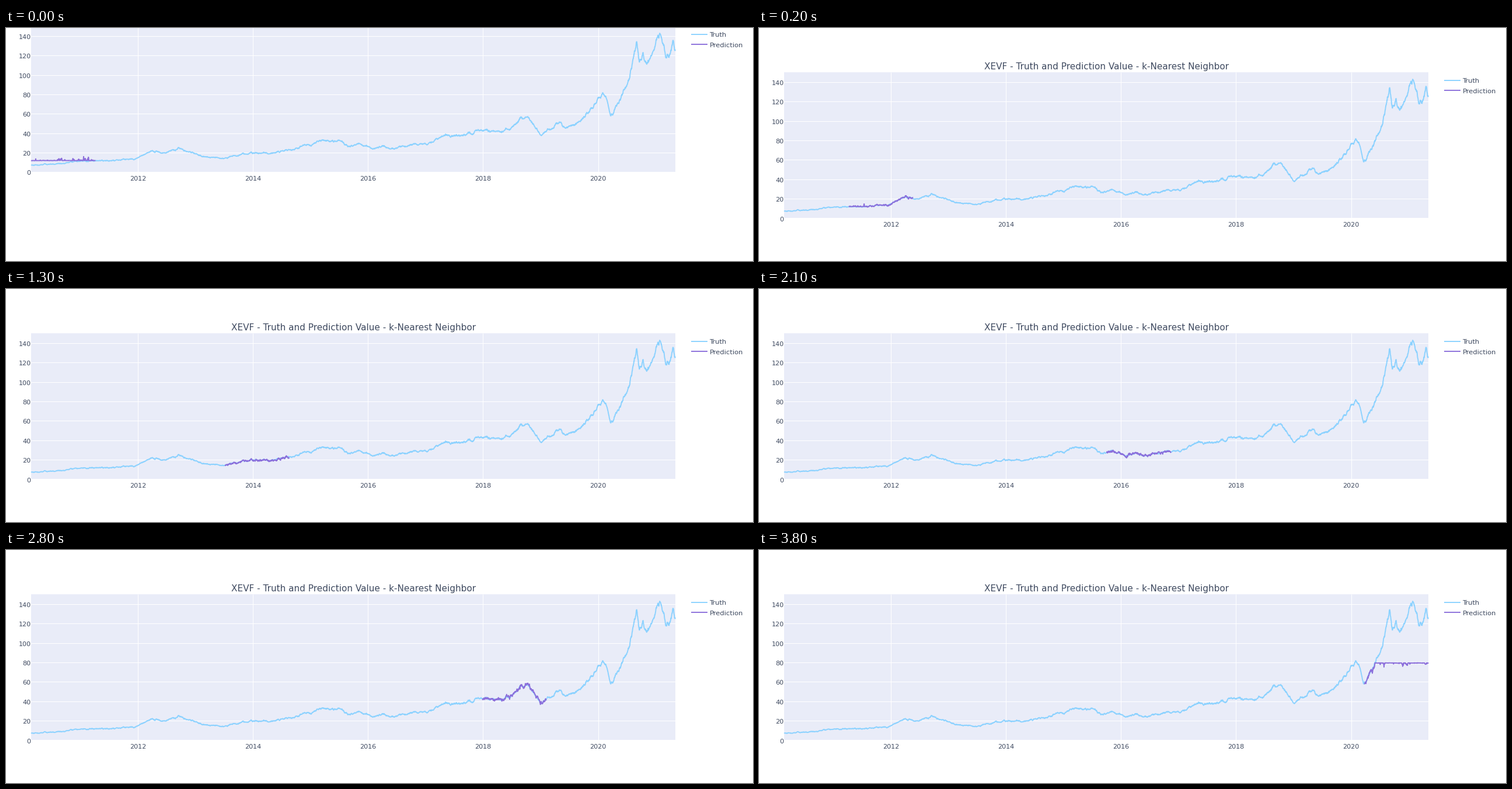
These frames come from a looping animation (1280 px wide and 400 px high, 4300 ms). A matplotlib script:

```python
import numpy as np
import matplotlib
import matplotlib.pyplot as plt
from matplotlib.animation import FuncAnimation
from matplotlib.patches import Rectangle

W, H, DPI = 1280, 400, 100
PT = 72 / DPI                      # points per pixel
LEFT, RIGHT, TOP, BASE = 43, 1147, 76, 326.5
TRUTH, PRED = "#8CD2FF", "#8C6FDB"
PANEL, INK = "#E9ECF8", "#3F4A60"
SCROLL = 79                        # page offset before the view settles
STARTS = [0, 2, 8, 11, 15, 21, 24, 26, 30, 36]   # first tick of each fold
KNOWN = 12, 79.5                   # range the predictor can reach

matplotlib.rcParams["font.family"] = "DejaVu Sans"
matplotlib.rcParams["path.simplify"] = False
rng = np.random.default_rng(12)


def px(year):
    return 226.3 + 98.525 * (year - 2012)


def py(value):
    return BASE - 1.668 * value


def drift(n, keep):
    """Mean-reverting noise with unit spread."""
    out = np.zeros(n)
    kicks = rng.normal(0, np.sqrt(1 - keep ** 2), n)
    for i in range(1, n):
        out[i] = keep * out[i - 1] + kicks[i]
    return out


# Main turning points of the trend: year, value
turns = np.array([
    (2010.14, 7), (2010.7, 9), (2010.85, 11), (2011.5, 11.8), (2011.95, 14),
    (2012.25, 21.5), (2012.4, 19.5), (2012.72, 24.5), (2013.1, 16.5),
    (2013.5, 14.3), (2013.97, 20), (2014.3, 18.8), (2014.78, 25),
    (2014.9, 29), (2015, 27), (2015.15, 32), (2015.55, 32), (2015.65, 26.5),
    (2015.87, 29.5), (2016.08, 24), (2016.28, 27.5), (2016.37, 23.5),
    (2016.8, 28.5), (2017.03, 29.5), (2017.37, 38.5), (2017.5, 36.5),
    (2018.05, 44), (2018.32, 41), (2018.53, 47.5), (2018.67, 56),
    (2018.8, 55), (2019, 37), (2019.34, 52), (2019.42, 44.5), (2019.7, 53),
    (2020.07, 80), (2020.13, 80), (2020.22, 57), (2020.55, 97),
    (2020.67, 132), (2020.72, 110), (2020.78, 121), (2020.84, 111),
    (2021.07, 141), (2021.18, 119), (2021.25, 122), (2021.3, 134),
    (2021.346, 128)])

days = np.arange(2010.14, 2021.346, 1 / 252)
trend = np.interp(days, *turns.T)
truth = trend + drift(len(days), 0.9) * (0.2 + 0.016 * trend)


def prediction(idx):
    """Lagging copy of the truth, held inside the known range."""
    seen = truth[np.maximum(idx - 2, 0)]
    held = np.clip(seen, *KNOWN)
    inward = np.sign(held - seen)
    noise = drift(len(idx), 0.7)
    slip = inward * 1.7 * np.maximum(noise - 0.9, 0) + 0.12 * noise
    wobble = noise * (0.15 + 0.016 * seen)
    return px(days[idx]), py(held + np.where(inward, slip, wobble))


folds = [prediction(idx)
         for idx in np.array_split(np.arange(len(days)), len(STARTS))]

fig = plt.figure(figsize=(W / DPI, H / DPI), dpi=DPI, facecolor="white")
ax = fig.add_axes([0, 0, 1, 1])
ax.set_xlim(0, W)
ax.axis("off")


def label(x, y, text, size=11.1, ha="center"):
    ax.text(x, y, text, fontsize=size * PT, color=INK, ha=ha, va="baseline")


def stroke(x, y, color, width, z=3):
    return ax.plot(x, y, color=color, lw=width * PT, zorder=z,
                   solid_capstyle="butt")[0]


ax.add_patch(Rectangle((LEFT, TOP), RIGHT - LEFT, BASE - TOP,
                       facecolor=PANEL, edgecolor="none", zorder=0))
for value in range(0, 141, 20):
    y = py(value)
    stroke([LEFT, RIGHT], [y, y], "white", 1 if value else 2, 1)
    label(42.5, y + 5, str(value), ha="right")
for year in range(2012, 2021, 2):
    x = px(year)
    stroke([x, x], [TOP, BASE], "white", 1, 1)
    label(x, 341.3, str(year))

label(595.7, 70.7, "XEVF - Truth and Prediction Value - k-Nearest Neighbor", 15.25)
for y, name, color in ((89.5, "Truth", TRUTH), (107.3, "Prediction", PRED)):
    stroke([1174, 1202], [y, y], color, 1.9)
    label(1206, y + 4.3, name, 11.5, "left")

stroke(px(days), py(truth), TRUTH, 1.9)
pred_line = stroke([], [], PRED, 1.9, 4)


def update(i):
    fold = sum(i >= s for s in STARTS) - 1
    top = SCROLL if fold == 0 else 0
    ax.set_ylim(H + top, top)
    pred_line.set_data(*folds[fold])
    return [pred_line]


anim = FuncAnimation(fig, update, frames=43, interval=100, repeat=True,
                     repeat_delay=0, blit=False)
plt.show()
```
